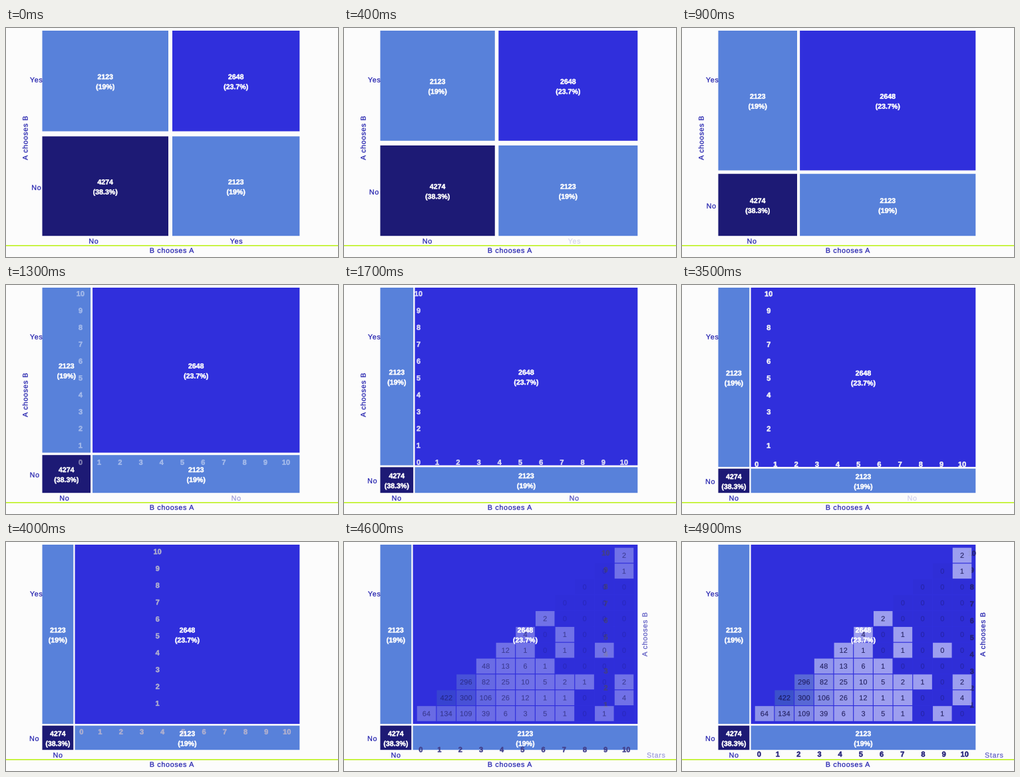
Write a matplotlib script that moves like this. It is 499 px wide and 345 px high and loops after 5000 ms.

```python
import matplotlib.pyplot as plt
from matplotlib.animation import FuncAnimation
from matplotlib.colors import to_rgb
from matplotlib.patches import PathPatch, Rectangle
from matplotlib.path import Path
from matplotlib.textpath import TextPath
from matplotlib.transforms import Affine2D
import numpy as np

W, H, DPI = 499, 345, 64
PX = 72 / DPI
FRAMES, STEP = 50, 100
NAVY, BLUE, SKY = "#1d1a75", "#302fdc", "#5881da"
INK, PALE = "#211fae", "#b2b4f3"
LEFT, TOP, RIGHT, BOTTOM = 54.5, 4, 441.3, 313.2

# Lower triangle of counts: row j starts at column j
COUNTS = [
    [64, 134, 109, 39, 6, 3, 5, 1, 0, 1, 0],
    [422, 300, 106, 26, 12, 1, 1, 0, 0, 4],
    [296, 82, 25, 10, 5, 2, 1, 0, 2],
    [48, 13, 6, 1, 0, 0, 0, 0],
    [12, 1, 0, 1, 0, 0, 0],
    [4, 0, 1, 0, 0, 0],
    [2, 0, 0, 0, 0],
    [0, 0, 0, 0],
    [0, 0, 0],
    [0, 1],
    [2],
]
LIT_ZERO = (9, 4)
CELL_W, CELL_H, CELL_GAP = 29.7, 23.85, 1.2

fig = plt.figure(figsize=(W / DPI, H / DPI), dpi=DPI, facecolor="#fcfcfc")
ax = fig.add_axes([0, 0, 1, 1])
ax.set_xlim(0, W)
ax.set_ylim(H, 0)
ax.axis("off")


def ramp(t, start, end):
    return float(np.clip((t - start) / (end - start), 0, 1))


def ease(t, start, length):
    u = ramp(t, start, start + length)
    return 2 * u * u if u < 0.5 else 1 - 2 * (1 - u) ** 2


def lerp(a, b, p):
    return a + (b - a) * p


def mix(a, b, p):
    return tuple(lerp(np.array(to_rgb(a)), np.array(to_rgb(b)), p))


def box(x, y, w, h, color, z):
    return ax.add_patch(Rectangle((x, y), w, h, fc=color, lw=0, zorder=z,
                                  snap=False))


def outline(text, size, weight, gap):
    """Letter shapes with extra tracking between them."""
    def shape(s):
        return TextPath((0, 0), s, size=size,
                        prop={"family": "Liberation Sans", "weight": weight})

    glyphs = []
    for k, ch in enumerate(text):
        if ch != " ":
            glyph = shape(ch)
            end = shape(text[:k + 1]).get_extents().x1
            dx = end - glyph.get_extents().x1 + gap * k
            glyphs.append(Path(glyph.vertices + [dx, 0], glyph.codes))
    return Path.make_compound_path(*glyphs)


class Label:
    """Text centred on a point, vertically by its cap height."""

    def __init__(self, text, x, y, size=10.7, color=INK, weight="normal",
                 gap=0.7, stroke=0.25, z=3, angle=0):
        path = outline(text, size, weight, gap)
        ext = path.get_extents()
        self.base = (Affine2D().translate(-(ext.x0 + ext.x1) / 2, -0.35 * size)
                     .scale(1, -1).rotate_deg(-angle))
        self.art = ax.add_patch(PathPatch(path, fc=color, ec=color,
                                          lw=stroke * PX, zorder=z, snap=False))
        self.move(x, y)

    def move(self, x, y):
        self.art.set_transform(self.base + Affine2D().translate(x, y) + ax.transData)

    def fade(self, alpha):
        self.art.set_alpha(alpha)
        self.art.set_visible(alpha > 0)

    def tint(self, color):
        self.art.set_color(color)


def heavy(text, size, z):
    return Label(text, 0, 0, size, "white", "bold", gap=0, stroke=0.5, z=z)


class Tile:
    """A quadrant with its count and share."""

    def __init__(self, color, count, share):
        self.box = box(0, 0, 1, 1, color, 1)
        self.lines = [heavy(s, 10.6, 8) for s in (count, f"({share})")]

    def place(self, x0, y0, x1, y1):
        self.box.set_bounds(x0, y0, x1 - x0, y1 - y0)
        for line, dy in zip(self.lines, (-6.4, 8.6)):
            line.move((x0 + x1) / 2, (y0 + y1) / 2 + dy)


class Cell:
    """One heatmap square."""

    def __init__(self, i, j, n):
        x, y = 124 + CELL_W * i, 258.5 - CELL_H * j
        w, h = CELL_W - CELL_GAP, CELL_H - CELL_GAP
        lit = n > 0 or (i, j) == LIT_ZERO
        self.ink = 0.95 if lit else 0.35
        self.fill = 0.9 if lit else 0.05
        color = mix(PALE, "#3f58c8", n / 422) if lit else NAVY
        self.box = box(x - w / 2, y - h / 2, w, h, color, 5)
        self.text = Label(str(n), x, y, 10.8, "#15124f", gap=0.2, stroke=0.1, z=6)

    def fade(self, a):
        self.box.set_alpha(a * self.fill)
        self.box.set_visible(a > 0)
        self.text.fade(a * self.ink)


box(0, 327, W, 1.6, "#bdf21c", 2)

yes_no = Tile(SKY, "2123", "19%")
yes_yes = Tile(BLUE, "2648", "23.7%")
no_no = Tile(NAVY, "4274", "38.3%")
no_yes = Tile(SKY, "2123", "19%")

Label("Yes", 45.3, 78)
Label("B chooses A", 249.5, 335)
side_no = Label("No", 45.5, 240)
base_no = Label("No", 132, 321)
base_yes = Label("Yes", 346, 321)
late_no = Label("No", 346, 321)
left_title = Label("A chooses B", 28.8, 166, angle=90)
right_title = Label("A chooses B", 452, 139.5, angle=90)
stars = Label("Stars", 469, 321)

x_nums = [heavy(str(i), 11, 4) for i in range(11)]
y_nums = [heavy(str(i), 11, 4) for i in range(1, 11)]
cells = [Cell(j + k, j, n) for j, row in enumerate(COUNTS) for k, n in enumerate(row)]


def draw(frame):
    t = frame * STEP
    grow = ease(t, -100, 2000)
    shift = ease(t, 3170, 2000)

    # Quadrants
    x_in, x_out = lerp(244.7, 101.3, grow), lerp(250.7, 103.6, grow)
    y_in, y_out = lerp(155, 274, grow), lerp(162.7, 276.7, grow)
    yes_no.place(LEFT, TOP, x_in, y_in)
    yes_yes.place(x_out, TOP, RIGHT, y_in)
    no_no.place(LEFT, y_out, x_in, BOTTOM)
    no_yes.place(x_out, y_out, RIGHT, BOTTOM)

    # Category labels
    shown = ramp(t, 900, 1950)
    side_no.move(lerp(45.7, 42.5, grow), lerp(240, 296, grow))
    base_no.move(lerp(132, 78, grow), 321)
    base_yes.fade(1 - ramp(t, 0, 470))
    late_no.fade(shown * (1 - ramp(t, 3000, 3600)))
    left_title.fade(1 - ramp(t, 3000, 3500))
    right_title.fade(ramp(t, 4200, 4800))
    stars.fade(ramp(t, 4200, 5200) * 0.9)

    # Scale numbers slide out of the big tile and darken
    tone = mix("white", NAVY, shift)
    for i, num in enumerate(x_nums):
        x = 109 + 31.2 * i + (3 if i == 0 else 0)
        num.move(x + 4 * shift, lerp(267, 321.5, shift))
    for i, num in enumerate(y_nums, 1):
        num.move(lerp(112, 448, shift), 267 - 25.4 * i + 4 * shift)
    for num in x_nums + y_nums:
        num.tint(tone)
        num.fade(shown)

    heat = ramp(t, 4150, 4950)
    for cell in cells:
        cell.fade(heat)
    return []


anim = FuncAnimation(fig, draw, frames=FRAMES, interval=STEP,
                     repeat=True, repeat_delay=0, blit=False)
plt.show()
```
